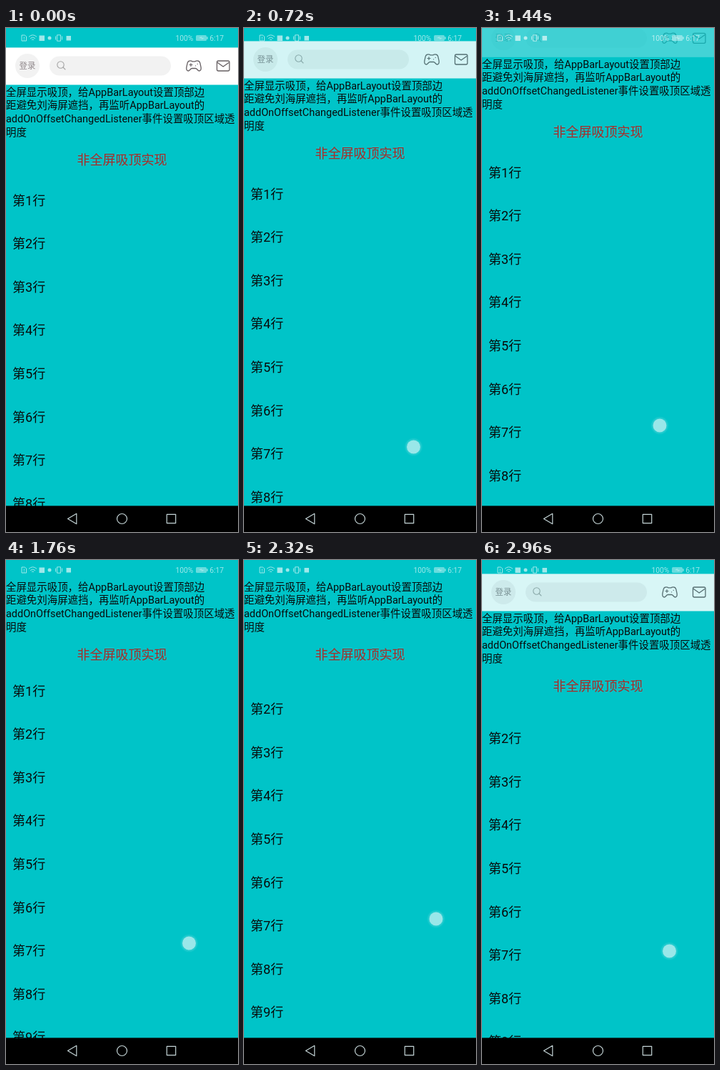
An HTML page for the animation above (3040 ms loop, 325x705 px).

```html
<!DOCTYPE html>
<html lang="zh-CN">
<head>
<meta charset="utf-8">
<title>吸顶</title>
<style>
@property --bar { syntax: "<number>"; inherits: true; initial-value: 0; }
@property --list { syntax: "<number>"; inherits: true; initial-value: 0; }
@property --x { syntax: "<number>"; inherits: true; initial-value: 235; }
@property --y { syntax: "<number>"; inherits: true; initial-value: 597; }
@property --on { syntax: "<number>"; inherits: true; initial-value: 0; }

html, body { margin: 0; width: 100%; height: 100%; overflow: hidden; background: #00c4c8; }
#stage {
  position: relative; width: 325px; height: 705px; overflow: hidden;
  background: #00c4c8; color: #080c0c;
  font-family: Roboto, "Noto Sans CJK SC", "Noto Sans CJK", sans-serif;
  white-space: nowrap;
  animation: drag 3040ms infinite;
}
#stage > *, #page > * { position: absolute; left: 0; }
svg { display: block; overflow: visible; }

/* The page follows the finger: the bar collapses first, then the list scrolls. */
#page { top: 0; width: 325px; height: 705px; transform: translateY(calc(var(--bar) * -1px)); }
#bar { top: 27px; width: 325px; height: 53px; opacity: calc(1 - var(--bar) / 52.5); }
#note { top: 81.7px; margin: 0; font-size: 14.44px; line-height: 18.8px; }
#title { top: 172px; width: 325px; margin: 0; text-align: center; font-size: 18.05px; line-height: 25px; color: #ad2a26; }
#list { top: 211.6px; width: 325px; height: 512px; overflow: hidden; }
#rows { transform: translateY(calc(var(--list) * -1px)); }
#rows div { height: 60.6px; padding-left: 9px; font-size: 18.05px; line-height: 60.6px; }
#touch {
  top: 0; width: 19px; height: 19px; margin: -9.5px; border-radius: 50%;
  background: rgba(255, 255, 255, .6);
  box-shadow: 0 0 2px 2px rgba(255, 255, 255, .16);
  opacity: var(--on);
  transform: translate(calc(var(--x) * 1px), calc(var(--y) * 1px));
}
#status { top: 0; }
#nav { top: 668px; }

@keyframes drag {
  0%       { --bar: 0;    --list: 0;    --x: 235;   --y: 597;   --on: 0; animation-timing-function: steps(1); }
  7.8947%  { --bar: 0;    --list: 0;    --x: 235;   --y: 597;   --on: 1; animation-timing-function: steps(2); }
  13.1578% { --bar: 0;    --list: 0;    --x: 235;   --y: 597;   --on: 1; animation-timing-function: steps(4); }
  23.6842% { --bar: 9;    --list: 0;    --x: 237;   --y: 585.5; --on: 1; animation-timing-function: steps(4); }
  34.2105% { --bar: 20.3; --list: 0;    --x: 241.5; --y: 574.5; --on: 1; animation-timing-function: steps(5); }
  47.3684% { --bar: 38.7; --list: 0;    --x: 248.5; --y: 555.5; --on: 1; animation-timing-function: steps(3); }
  55.2631% { --bar: 52.5; --list: 0.8;  --x: 254;   --y: 540.5; --on: 1; animation-timing-function: steps(1); }
  57.8947% { --bar: 52.5; --list: 5.8;  --x: 256;   --y: 535.5; --on: 1; animation-timing-function: steps(7); }
  76.3157% { --bar: 52.5; --list: 40.2; --x: 268.5; --y: 501.5; --on: 1; animation-timing-function: steps(1); }
  78.9473% { --bar: 52.5; --list: 44.2; --x: 270;   --y: 497.5; --on: 1; animation-timing-function: steps(3); }
  86.8421% { --bar: 52.5; --list: 44.2; --x: 270;   --y: 502;   --on: 1; animation-timing-function: steps(4); }
  97.3684% { --bar: 8;    --list: 44.2; --x: 262;   --y: 546.5; --on: 1; animation-timing-function: steps(1); }
  100%     { --bar: 8;    --list: 44.2; --x: 262;   --y: 546.5; --on: 1; }
}
</style>
</head>
<body>
<div id="stage">
  <div id="page">
    <div id="list"><div id="rows">
      <div>第1行</div><div>第2行</div><div>第3行</div><div>第4行</div><div>第5行</div>
      <div>第6行</div><div>第7行</div><div>第8行</div><div>第9行</div><div>第10行</div>
    </div></div>
    <div id="bar">
      <svg width="325" height="53" viewBox="0 27 325 53" fill="none" stroke="#665f62" stroke-width="1.3" stroke-linecap="round" stroke-linejoin="round">
        <rect y="27.4" width="325" height="52.1" fill="#fff" stroke="none"/>
        <g fill="#f2f2f2" stroke="none">
          <circle cx="30" cy="53" r="17"/>
          <rect x="61" y="39.5" width="170" height="27" rx="13.5"/>
        </g>
        <text x="30" y="57" font-size="11.4" text-anchor="middle" fill="#8d8588" stroke="none">登录</text>
        <g stroke="#a5a5a5" stroke-width="1.1">
          <circle cx="76.5" cy="51.5" r="4.7"/>
          <path d="M80 55l3 3"/>
        </g>
        <path d="M258 45.8q2 0 3 1h4q1-1 3-1q3 0 3.8 3l1.3 6q.6 5-2.3 5.2c-2.4 0-3-3.5-5.3-3.5h-5c-2.3 0-2.9 3.5-5.3 3.5q-2.9-.2-2.3-5.2l1.3-6q.8-3 3.8-3z"/>
        <path stroke-width="1.2" d="M257 51.5h4M259 49.5v4M265.5 52.8h.1M268.2 50.4h.1"/>
        <rect x="295.5" y="46" width="17.5" height="14" rx="2"/>
        <path d="M296.5 48.5l7.7 5.5 7.8-5.5"/>
      </svg>
    </div>
    <p id="note">全屏显示吸顶，给AppBarLayout设置顶部边<br>距避免刘海屏遮挡，再监听AppBarLayout的<br>addOnOffsetChangedListener事件设置吸顶区域透<br>明度</p>
    <p id="title">非全屏吸顶实现</p>
  </div>

  <svg id="status" width="325" height="27" fill="none" stroke="#fff" opacity=".62">
    <path d="M22 10h4.5l2 2v6H22zM25.3 12.5v2.5M25.3 16v1"/>
    <path d="M32 12.3q5.5-5 11 0M34 14.6q3.5-3 7 0M36 16.7q1.5-1.4 3 0"/>
    <path d="M71.5 9.8h5v8.4h-5zM69.5 11.5v5M78.5 11.5v5"/>
    <g fill="#fff" stroke="none">
      <rect x="46.5" y="10.5" width="7.5" height="7.5"/>
      <circle cx="61" cy="14" r="2.5"/>
      <rect x="84.5" y="11" width="6.5" height="6.5"/>
      <rect x="266" y="10" width="15" height="8" rx="1.5" opacity=".65"/>
      <rect x="281.3" y="12.3" width="1.3" height="3.4"/>
      <path d="M270 14l4-2v1.4l4 .6-4 2v-1.4z"/>
      <text x="237.5" y="17.6" font-size="10.3">100%</text>
      <text x="285.3" y="17.6" font-size="10.3">6:17</text>
    </g>
  </svg>

  <div id="touch"></div>

  <svg id="nav" width="325" height="37" viewBox="0 668 325 37" fill="none" stroke="#c3d3d5" stroke-width="1.2" stroke-linejoin="round">
    <rect y="668.4" width="325" height="37" fill="#000" stroke="none"/>
    <path d="M86.5 686.5l12.3-7.2v14.4z"/>
    <circle cx="162.5" cy="686.5" r="7"/>
    <rect x="225.3" y="680.3" width="12.4" height="12.4"/>
  </svg>
</div>
</body>
</html>
```
